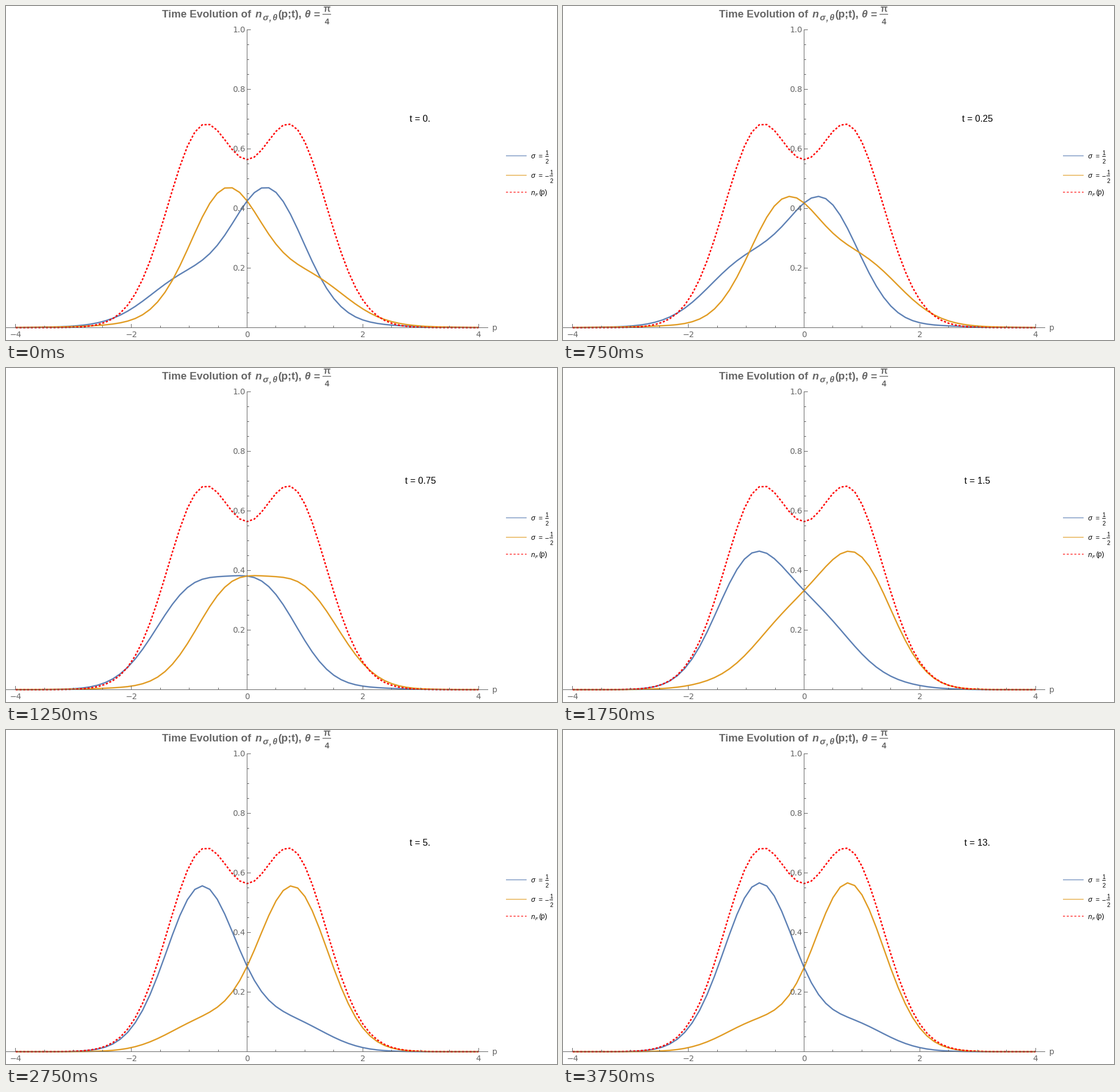
Write a matplotlib script that moves like this. It is 961 px wide and 583 px high and loops after 4000 ms.

```python
import numpy as np
import matplotlib.pyplot as plt
from matplotlib.animation import FuncAnimation

W, H, DPI = 961, 583, 64
PT = 72 / DPI                      # points per pixel
BLUE = (0.368, 0.507, 0.710)
ORANGE = (0.881, 0.611, 0.142)
RED = (1, 0, 0)
GRAY = (0.4, 0.4, 0.4)
SANS = "Liberation Sans"
DASH = (0, (3.6 * PT, 3.0 * PT))
TIMES = [0, 0.05, 0.1, 0.25, 0.5, 0.75, 1, 1.5, 2, 2.5, 3, 5, 7, 9, 11, 13]
THETA = np.pi / 4

plt.rcParams["lines.scale_dashes"] = False

# Two hard-core particles released from a harmonic trap.
U = np.linspace(-6, 6, 601)
STEP = U[1] - U[0]
LEFT, RIGHT = np.cos(THETA / 2), 1j * np.sin(THETA / 2)
GAP = U[None, :] - U[:, None]
PAIR = np.abs(GAP) * np.where(GAP < 0, LEFT, RIGHT)


def momentum(p, t):
    """Momentum distribution of the spin-up particle at time t."""
    b = np.sqrt(1 + t * t)
    wave = np.exp(-1j * b * np.outer(U, p) - ((1 - 1j * t) * U**2 / 2)[:, None])
    amp = PAIR @ wave * STEP
    return b / np.pi**2 * STEP * (np.exp(-U**2) @ np.abs(amp)**2)


def px(p):
    return 420.5 + 100.9 * p


def py(n):
    return 561.5 - 520 * n


def crisp(v):
    return np.floor(v + 1e-6) + 0.5


fig = plt.figure(figsize=(W / DPI, H / DPI), dpi=DPI, facecolor="white")
ax = fig.add_axes([0, 0, 1, 1])
ax.set_xlim(0, W)
ax.set_ylim(H, 0)
ax.axis("off")


def line(x, y, color=GRAY, width=1.0, style="-", z=5, alpha=1):
    return ax.plot(x, y, color=color, lw=width * PT, ls=style, zorder=z, alpha=alpha,
                   dash_capstyle="butt", solid_capstyle="butt", snap=False)[0]


def text(x, y, s, size, color="black", ha="left", va="baseline", font=SANS, **kw):
    return ax.text(x, y, s, fontsize=size * PT, color=color, ha=ha, va=va,
                   family=font, zorder=6, **kw)


def draw_axes():
    line([0, 841], [561.5, 561.5])
    line([420.5, 420.5], [41, 562])
    for i in range(-8, 9):
        x = crisp(px(i / 2))
        line([x, x], [561, 555 if i % 4 == 0 else 558])
        if i % 4 == 0:
            label = str(i // 2).replace("-", "\u2212")
            text(px(i / 2), 578, label, 14, GRAY, "center", font="DejaVu Sans")
    for i in range(1, 21):
        y = crisp(py(i / 20))
        line([421, 427 if i % 4 == 0 else 424], [y, y])
        if i % 4 == 0:
            text(417.5, y + 4.8, f"{i / 20:.1f}", 14, GRAY, "right", font="DejaVu Sans")
    text(852.5, 566, "p", 14, GRAY, "center", font="DejaVu Sans")


def draw_title():
    bold = dict(color=GRAY, weight="bold")
    text(272.5, 20.5, "Time Evolution of", 18.67, **bold)
    text(435, 20.5, "n", 18.67, style="italic", **bold)
    for x, s in ((447.5, "\u03c3"), (458.5, ","), (464, "\u03b8")):
        text(x, 25, s, 15, style="italic", **bold)
    text(474.5, 20.5, "(p;t),", 18.67, **bold)
    text(520.5, 20.5, "\u03b8", 18.67, style="italic", **bold)
    text(536, 20.5, "=", 18.67, **bold)
    text(559.5, 10, "\u03c0", 16, ha="center", **bold)
    line([552, 567], [14.5, 14.5], width=1.3)
    text(559.5, 32, "4", 14, ha="center", **bold)


def half(x, y):
    text(x, y - 1.5, "1", 10, ha="center")
    line([x - 3, x + 3], [y + 1, y + 1], "black")
    text(x, y + 13.5, "2", 10, ha="center")


def draw_legend():
    for y, color, style in ((261.5, BLUE, "-"), (295.5, ORANGE, "-"), (325, RED, DASH)):
        line([872, 908], [y, y], color, 1.4, style, alpha=0.85)
    for y in (261.5, 295.5):
        text(915.5, y + 4.5, "\u03c3", 12, style="italic")
        text(928, y + 4.5, "=", 12)
    half(943.5, 261.5)
    text(939.5, 300, "\u2212", 12)
    half(951, 295.5)
    text(915.5, 329.5, "n", 12, style="italic")
    text(922.3, 331.5, "F", 8, style="italic")
    text(929, 329.5, "(p)", 12)


draw_axes()
draw_title()
draw_legend()

P = np.concatenate([np.linspace(-4, 0, 32), np.linspace(0, 4, 33)[1:]])
CURVES = [(py(momentum(P, t)), py(momentum(-P, t))) for t in TIMES]

up = line(px(P), CURVES[0][0], BLUE, 2.4, z=2)
down = line(px(P), CURVES[0][1], ORANGE, 2.4, z=3)
line(px(P), py(np.exp(-P**2) * (1 + 2 * P**2) / np.sqrt(np.pi)), RED, 2.5, DASH, z=4)
clock = text(722.5, 202, "", 16, ha="center")


def update(i):
    t = TIMES[i]
    up.set_ydata(CURVES[i][0])
    down.set_ydata(CURVES[i][1])
    clock.set_text(f"t = {t:g}" + ("." if t == int(t) else ""))
    return up, down, clock


anim = FuncAnimation(fig, update, frames=len(TIMES), interval=250, repeat=True)
plt.show()
```
